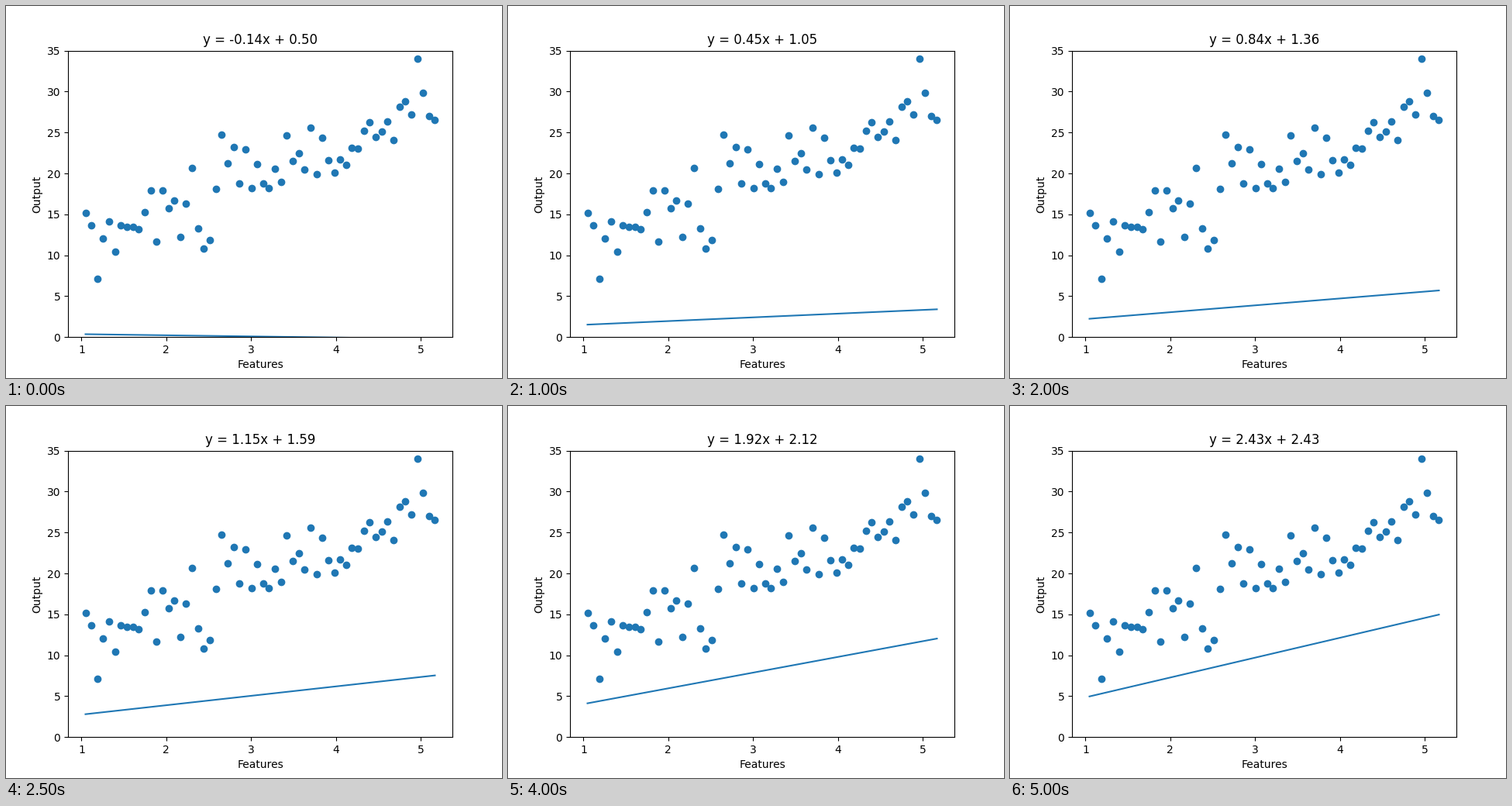
These frames come from a looping animation (640x480 px, 5.5 s). A matplotlib script:

```python
import numpy as np
import matplotlib.pyplot as plt
from matplotlib.animation import FuncAnimation

FRAMES = 11
INTERVAL = 500
RATE = 0.01

# Noisy samples around y = 4x + 7
x = np.deg2rad(np.arange(60, 300, 4))
y = 4 * x + 7 + np.random.RandomState(10).normal(0, 3, len(x))


def descend(steps):
    """Stochastic gradient descent, one sample per step."""
    bias, slope = np.random.RandomState(42).randn(2)
    path = [(slope, bias)]
    for xi, yi in zip(x[:steps], y):
        grad = -2 * (yi - (slope * xi + bias))
        slope -= RATE * grad * xi
        bias -= RATE * grad
        path.append((slope, bias))
    return path


path = descend(FRAMES - 1)

fig, ax = plt.subplots(figsize=(6.4, 4.8), dpi=100)
ax.scatter(x, y)
line, = ax.plot(x, path[0][0] * x + path[0][1])
ax.set_ylim(0, 35)
ax.set_xlabel("Features")
ax.set_ylabel("Output")
title = ax.set_title("")


def update(step):
    slope, bias = path[step]
    line.set_ydata(slope * x + bias)
    title.set_text(f"y = {slope:.2f}x + {bias:.2f}")
    return line, title


anim = FuncAnimation(fig, update, frames=FRAMES, interval=INTERVAL,
                     repeat=True, repeat_delay=0, blit=False)
plt.show()
```
